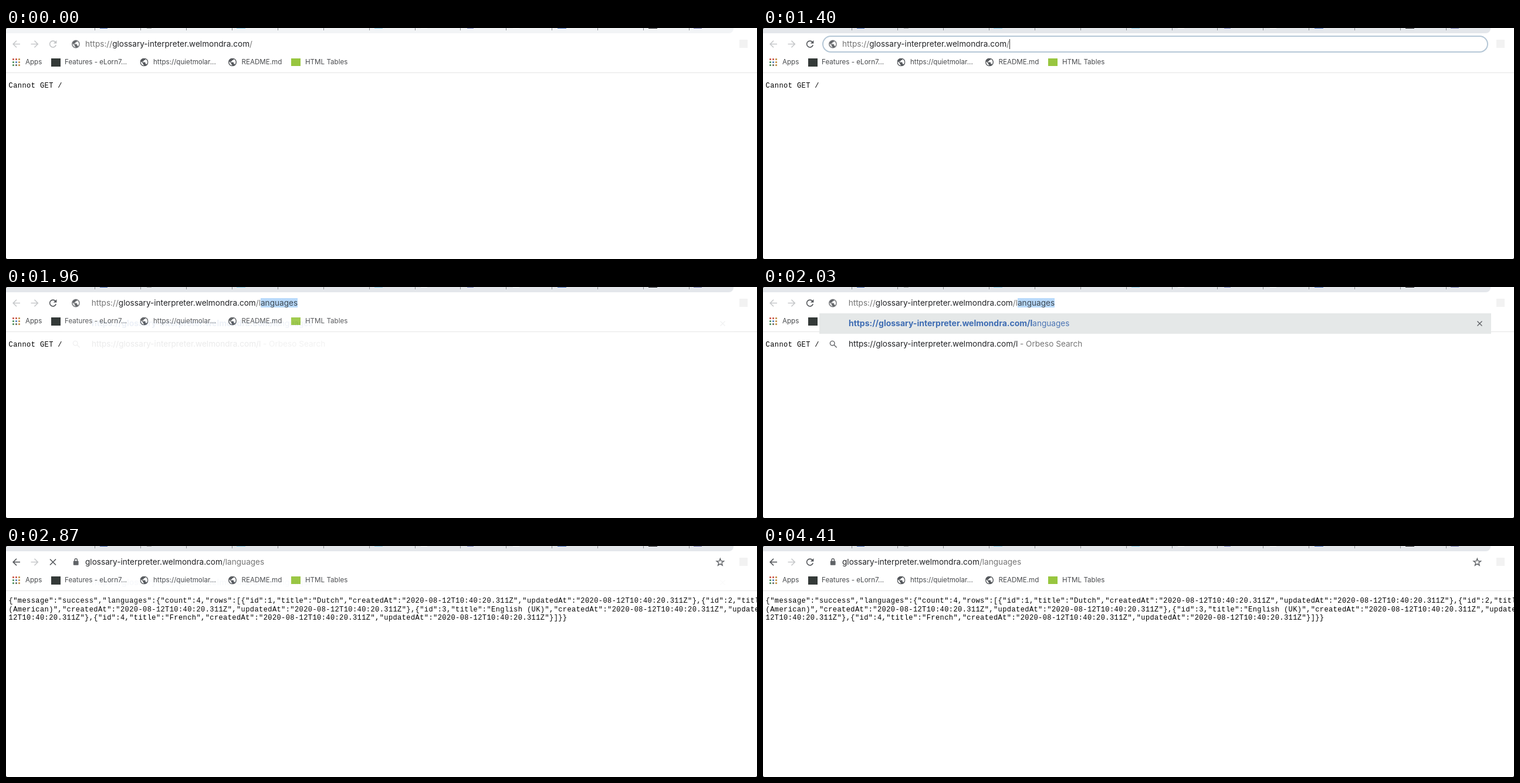
An HTML page for the animation above (4550 ms loop, 1280 by 395 pixels).

```html
<!DOCTYPE html>
<html lang="en">
<head>
<meta charset="utf-8">
<title>Browser window</title>
<style>
html, body { margin: 0; width: 100%; height: 100%; overflow: hidden; background: #fff; }
#stage { position: relative; width: 1280px; height: 395px; overflow: hidden; background: #fff;
  font: 13.6px/18px Inter, "Open Sans", sans-serif; font-feature-settings: "calt" 0; color: #757575; }
#stage > *, #popup > * { position: absolute; }
svg { left: 0; top: 0; overflow: hidden; }
.line, .mark, pre { margin: 0; white-space: pre; }
.line { top: 18px; }
.line b, .dark { font-weight: 400; color: #222326; }
.mark { top: 49px; font-size: 11.6px; color: #494b4e; }
pre { left: 4.6px; color: #000; font: 12px/14.7px "Liberation Mono", monospace; letter-spacing: .414px; }

#strip { left: 0; top: 0; width: 1240px; height: 9px; border-bottom-right-radius: 8px; background: #e4e7eb; }
#tabs { left: 151px; top: 0; width: 1015px; height: 4px;
  background: repeating-linear-gradient(90deg, #8d9094 0 1px, transparent 1px 77.93px); }
#rule { left: 0; top: 76px; width: 1280px; height: 1px; background: #e5e5e5; }
#ring { left: 101px; top: 13px; width: 1131px; height: 25px; border: 2px solid #b5c7d6; border-radius: 15px; }
#caret { display: inline-block; width: 1px; height: 17px; vertical-align: -4px; background: #333; }
.picked { background: #b9dafb; color: #3c4650; }

#popup { left: 95.5px; top: 9px; width: 1145.5px; height: 110.5px; background: #fff;
  border-radius: 8px; box-shadow: 0 6px 6px rgba(0, 0, 0, .17), 0 1px 2px rgba(0, 0, 0, .12);
  clip-path: inset(12px -12px -16px); }
#row { left: 0; top: 36px; width: 100%; height: 35px; background: #e8e8e8; }
#popup .line { left: 50.5px; }
#popup .hit { top: 44px; color: #4a74b4; }
#popup .hit b { font-size: 14px; font-weight: 700; color: #3f6db3; }
#popup .find { top: 79px; }
#popup .engine { left: 342.5px; }

/* timeline: 4550 ms per loop */
.before, .typing, .after, .busy, .ready, #caret { animation: 4550ms step-end infinite; }
.before { animation-name: before; }
.typing { animation-name: typing; }
.after { animation-name: after; }
.globe, .first { animation: 4550ms step-end infinite untilLoad; }
.busy { animation-name: busy; }
.ready { animation-name: ready; }
#caret { animation-name: caret; }
#ring { animation: ring 4550ms linear infinite; }
#strip { animation: wakeStrip 4550ms linear infinite; }
#reload { animation: wakeIcon 4550ms linear infinite; }
#popup { animation: popup 4550ms step-end infinite; }
#row { animation: row 4550ms linear infinite; }

@keyframes before { 0% { opacity: 1 } 42.967%, 100% { opacity: 0 } }
@keyframes typing { 0% { opacity: 0 } 42.967% { opacity: 1 } 62.967%, 100% { opacity: 0 } }
@keyframes untilLoad { 0% { opacity: 1 } 62.967%, 100% { opacity: 0 } }
@keyframes after { 0% { opacity: 0 } 62.967%, 100% { opacity: 1 } }
@keyframes busy { 0% { opacity: 0 } 62.967% { opacity: 1 } 66.044%, 100% { opacity: 0 } }
@keyframes ready { 0% { opacity: 1 } 62.967% { opacity: 0 } 66.044%, 100% { opacity: 1 } }
@keyframes caret { 0% { opacity: 0 } 24.505% { opacity: 1 } 36.813%, 100% { opacity: 0 } }
@keyframes ring { 0%, 23.1% { opacity: 0 } 29.2%, 42.96% { opacity: 1 } 42.967%, 100% { opacity: 0 } }
@keyframes wakeStrip { 0%, 1.429% { background: #f2f4f6 } 4.6%, 100% { background: #e4e7eb } }
@keyframes wakeIcon { 0%, 1.429% { color: #c3c5c7 } 4.6%, 100% { color: #55585c } }
@keyframes popup {
  0% { opacity: 0 } 42.967% { opacity: .09; box-shadow: none } 44.505% { opacity: 1 }
  62.967% { opacity: .03; box-shadow: none } 64.505%, 100% { opacity: 0 }
}
@keyframes row {
  0%, 44.5% { background: #fff } 44.505%, 44.7% { background: #e5e8e8 }
  47.7%, 62.96% { background: #e8e8e8 } 62.967%, 100% { background: #fff }
}
</style>
</head>
<body>
<div id="stage">
  <div id="strip"></div>
  <div id="tabs"></div>
  <div id="rule"></div>

  <pre class="first" style="top:92px">Cannot GET /</pre>
  <pre class="after" id="json" style="top:86.8px"></pre>

  <!-- tab icon edges and bookmark icons -->
  <svg width="1280" height="395">
    <g id="favicons"></g>
    <g id="apps"></g>
    <rect x="77" y="52" width="16" height="14" fill="#343a38"/>
    <rect x="486" y="52" width="16" height="13" fill="#98c63f"/>
    <rect x="1250" y="20" width="14" height="14" fill="#f2f2f2"/>
    <g fill="#55585c">
      <use href="#world" x="228.5" y="51.5" width="14" height="14"/>
      <use href="#world" x="379" y="51.5" width="14" height="14"/>
    </g>
    <path fill="#555" d="M0 0h2l-2 2zM0 395v-2l2 2zM1280 395h-2l2-2z"/>
  </svg>
  <span class="mark" style="left:33px">Apps</span>
  <span class="mark" style="left:100px">Features - eLorn7...</span>
  <span class="mark" style="left:251px">https://quietmolar...</span>
  <span class="mark" style="left:401.5px">README.md</span>
  <span class="mark" style="left:510px">HTML Tables</span>

  <div id="ring"></div>

  <div id="popup">
    <div id="row"></div>
    <span class="line hit"><b>https://<i class="host"></i>/l</b>anguages</span>
    <span class="line find dark">https://<i class="host"></i>/l</span>
    <span class="line find engine">- Orbeso Search</span>
    <svg width="1145" height="110" fill="none" stroke="#606367" stroke-width="1.4">
      <circle cx="22.2" cy="87.2" r="3.8"/>
      <path d="M25 90l4.6 4.6M1121.5 49.5l8 8m0-8l-8 8"/>
    </svg>
  </div>

  <!-- toolbar -->
  <svg width="1280" height="45" fill="none" stroke-width="1.6">
    <symbol id="world" viewBox="2 2 20 20">
      <path stroke="none" d="M12 2C6.48 2 2 6.48 2 12s4.48 10 10 10 10-4.48 10-10S17.52 2 12 2zm-1 17.93c-3.95-.49-7-3.85-7-7.93 0-.62.08-1.21.21-1.79L9 15v1c0 1.1.9 2 2 2v1.93zm6.9-2.54c-.26-.81-1-1.39-1.9-1.39h-1v-3c0-.55-.45-1-1-1H8v-2h2c.55 0 1-.45 1-1V7h2c1.1 0 2-.9 2-2v-.41c2.93 1.19 5 4.06 5 7.41 0 2.08-.8 3.97-2.1 5.39z"/>
    </symbol>
    <path id="back" stroke="#c6c8ca" d="M24 27.5H12.5M18 21.7l-5.8 5.8 5.8 5.8"/>
    <use href="#back" transform="matrix(-1 0 0 1 66.5 0)"/>
    <path class="after" stroke="#55585c" d="M24 27.5H12.5M18 21.7l-5.8 5.8 5.8 5.8"/>
    <g class="ready"><g id="reload" stroke="currentColor">
      <path d="M84.2 24.1A5.4 5.4 0 1 0 85.2 29"/>
      <path fill="currentColor" stroke="none" d="M86.4 20.9v5.6h-5.6z"/>
    </g></g>
    <path class="busy" stroke="#55585c" d="M75 22.5l10 10m0-10l-10 10"/>
    <g class="globe" fill="#606367"><use href="#world" x="112.2" y="20.7" width="13.6" height="13.6"/></g>
    <g class="after" stroke="#606367" stroke-width="1.4">
      <path d="M116.9 26v-1.9a2.3 2.3 0 0 1 4.6 0V26"/>
      <rect x="114.8" y="25.6" width="8.8" height="7.2" rx="1" fill="#606367" stroke="none"/>
      <path transform="translate(1217.3 27.9)" d="M0-6.5L1.6-2.2 6.2-2 2.6.8 3.8 5.3 0 2.7-3.8 5.3-2.6.8-6.2-2-1.6-2.2z"/>
    </g>
  </svg>
  <span class="line before" style="left:135px">https://<b class="host"></b>/<i id="caret"></i></span>
  <span class="line typing" style="left:145.7px">https://<b class="host"></b>/l<span class="picked">anguages</span></span>
  <span class="line after" style="left:135px"><b class="host"></b>/languages</span>
</div>

<script>
const host = "glossary-interpreter.welmondra.com";
for (const el of document.querySelectorAll(".host")) {
  el.textContent = host;
  el.style.fontStyle = "normal";
}

function add(parent, tag, attrs) {
  const el = document.createElementNS("http://www.w3.org/2000/svg", tag);
  for (const key in attrs) el.setAttribute(key, attrs[key]);
  document.getElementById(parent).append(el);
}

const edges = [
  [160, 13, "#4468b4"], [240, 8, "#a2a5a8"], [393, 15, "#8acdea"], [628, 14, "#8acdea"],
  [707, 11, "#fff"], [786, 11, "#7a83c4"], [864, 11, "#fff"], [940, 15, "#4770c0"],
  [1095, 15, "#202124"], [1172, 14, "#7276ae"]
];
for (const [x, width, fill] of edges) add("favicons", "rect", { x, y: 0, width, height: 1, fill });

const dots = ["#cf6558", "#cf6558", "#c79a56", "#5f9a69", "#6389c4", "#c79a56", "#5f9a69", "#777b70", "#c79a56"];
dots.forEach((fill, i) => add("apps", "rect", {
  x: 11 + i % 3 * 5, y: 52 + Math.floor(i / 3) * 5, width: 3, height: 3, rx: .6, fill
}));

const stamp = "2020-08-12T10:40:20.311Z";
const rows = ["Dutch", "English (American)", "English (UK)", "French"].map((title, i) =>
  ({ id: i + 1, title, createdAt: stamp, updatedAt: stamp }));
const reply = JSON.stringify({ message: "success", languages: { count: rows.length, rows } });
// the reply wraps at a space and after a hyphen
document.getElementById("json").textContent = reply
  .replace("English (American)", "English\n(American)")
  .replace(/12T(?=[^T]*"id":4)/, "\n12T");
</script>
</body>
</html>
```
